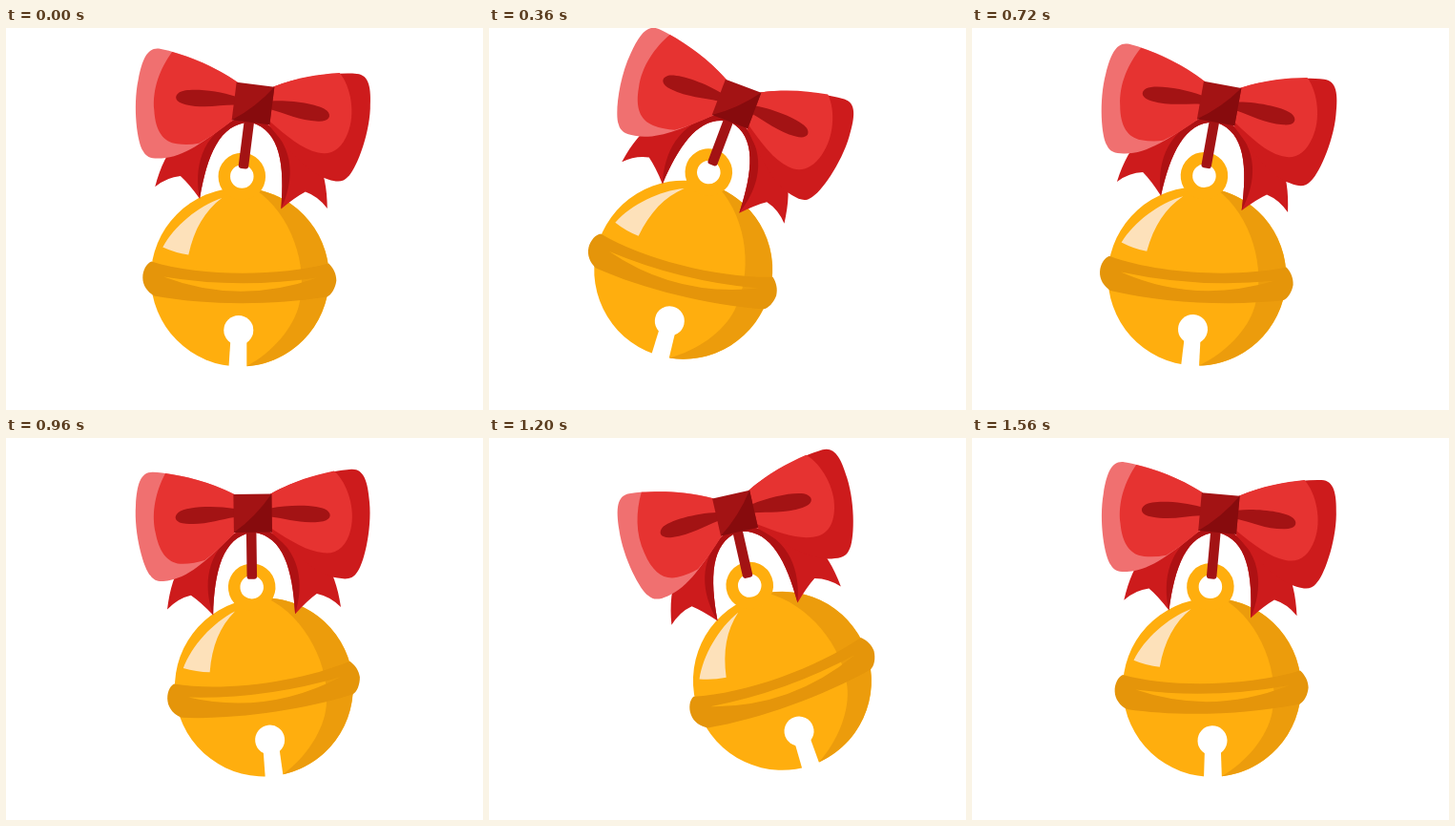
Animation, 500 px wide and 400 px high, one loop 1.6 s. Source, as an HTML page:

```html
<!DOCTYPE html>
<html lang="en">
<head>
<meta charset="utf-8">
<title>Swinging bell</title>
<style>
  html, body { margin: 0; width: 100%; height: 100%; overflow: hidden; background: #fff; }
  svg { display: block; width: 500px; height: 400px; }
</style>
</head>
<body>
<svg viewBox="0 0 500 400">
  <defs>
    <g id="tail">
      <path fill="#cd1b1c" d="M14 18L72 46C83 62 88 78 91 99.500Q80 88 66 85Q56 92 43 106C41 60 32 25 1 20Z"/>
      <path fill="#ae1113" d="M43 106C53 75 50 40 16 19L1 20C32 25 41 60 43 106Z"/>
    </g>
    <path id="loop" d="M19-20C45-34 80-43 104-44.500C117-45 121-32 122.500-10C125 20 115 57 108 64C104 70 98 71 88 69C65 65 45 45 19 20Z"/>
    <path id="fold" fill="#a31314" d="M19-5C40-9 70-8 78-2C84 3 81 9 70 10C50 12 35 6 19 4Z"/>
  </defs>

  <g id="swing">
    <g id="bell" transform="translate(-.7 -.5)">
      <path fill="#ffae0e" d="M222 174Q229 172 229 168H267Q267 172 274 174Z"/>
      <circle cx="246" cy="261.5" r="93.5" fill="#ffae0e"/>
      <path fill="#ec9c0c" d="M262 169.4C300 195 318 250 308 290C302 315 280 340 253 354.7A93.5 93.5 0 0 0 262 169.4Z"/>
      <circle cx="248" cy="156" r="18.5" fill="#fff" stroke="#ffae0e" stroke-width="12.5"/>
      <path fill="#fde1ba" d="M227 178.500C202 187 177 208 165 230Q178 236 192 238C198 211 209 192 227 178.500Z"/>
      <path fill="#e5950a" fill-rule="evenodd" d="M153 245C205 261 285 261 339 247C344 252 347 258 347 265C346 273 342 280 337 282C280 291 210 291 156 281C149 277 144 270 144 262C144 254 148 247 153 245ZM166 261Q245 291 327 262Q245 274 166 261Z"/>
      <g fill="#fff">
        <circle cx="244.5" cy="317" r="15.5"/>
        <path d="M236 328H253V358H234Z"/>
      </g>
    </g>

    <g id="bow" transform="translate(259 79) rotate(7.2)">
      <use href="#tail"/>
      <use href="#tail" transform="scale(-1 1)"/>
      <rect x="-7" y="18" width="10.5" height="51" rx="3" fill="#a31314"/>
      <use href="#loop" fill="#cd1b1c"/>
      <use href="#loop" fill="#f07070" transform="scale(-1 1)"/>
      <g fill="#e63331">
        <path d="M19-20C43-33 65-39 86-43C100-30 108-2 102.500 18C98 36 88 44 74 42.500C57 41 40 30 19 16Z"/>
        <path d="M-19-20C-45-34-72-40-91-43C-101-25-107-2-102 20C-98 42-88 52-74 52Q-62 52-51 48.500Q-34 36-19 20Z"/>
      </g>
      <use href="#fold"/>
      <use href="#fold" transform="scale(-1 1)"/>
      <path fill="#a31314" d="M-20-20H20V20H-20Z"/>
      <path fill="#870b0d" d="M20-20Q3 4-20 20H20Z"/>
    </g>
  </g>
</svg>
<script>
  const PERIOD = 1600, STEP = 40, RIGHT = 15, LEFT = -20;
  const swing = document.getElementById('swing');

  // Constant-speed swing: rest, RIGHT, rest, LEFT, rest, a quarter period each.
  function angleAt(ms) {
    const phase = ms % PERIOD / PERIOD * 4;
    return phase < 2 ? RIGHT * (1 - Math.abs(phase - 1)) : LEFT * (1 - Math.abs(phase - 3));
  }

  function draw() {
    const ms = Math.floor(performance.now() / STEP) * STEP;
    swing.setAttribute('transform', `rotate(${angleAt(ms)} 257.5 81.5)`);
    requestAnimationFrame(draw);
  }
  draw();
</script>
</body>
</html>
```
